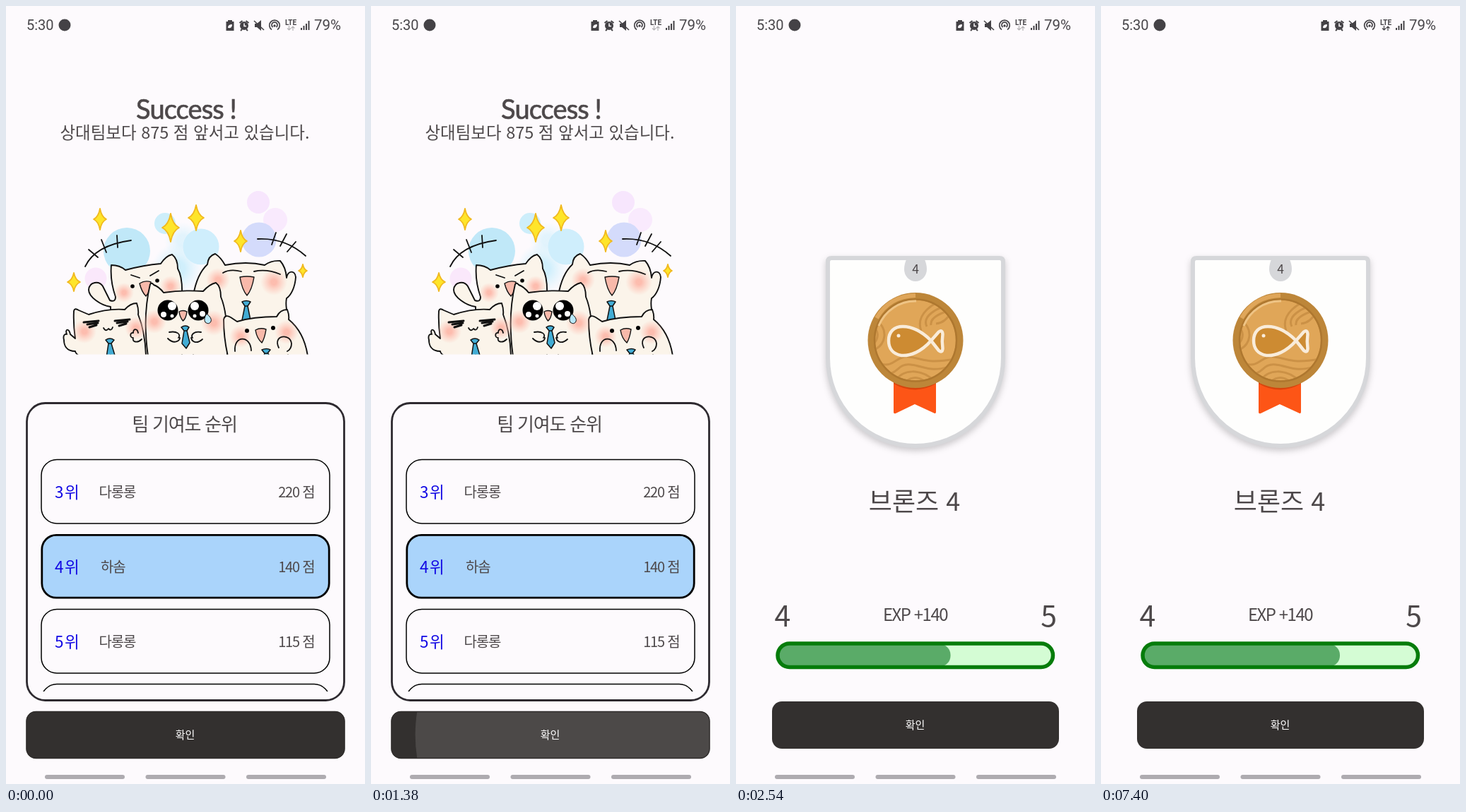
Recreate the animation shown at these times as an HTML page. Size 508x1102 px, loop 8000 ms.

```html
<!DOCTYPE html>
<html lang="ko">
<meta charset="utf-8">
<title>Team result</title>
<style>
  html, body { margin: 0; width: 100%; height: 100%; overflow: hidden; background: #fdfafd; }
  svg { display: block; width: 508px; height: 1102px; }
  text { font: 20px "Noto Sans CJK KR", sans-serif; fill: #4d484a; white-space: pre; }
  .mid { text-anchor: middle; }
  .end { text-anchor: end; }
  .thin { font-weight: 300; }
  .tight { letter-spacing: -1.2px; }
  .status { font-family: Roboto, sans-serif; fill: #48464a; }
  .success { font: 38px Lato, sans-serif; letter-spacing: -.9px; stroke: #4d484a; stroke-width: .7; }
  .rank { font-size: 22.5px; font-weight: 500; letter-spacing: 1.5px; fill: #1208e4; }
  .label { font-size: 15px; fill: #fff; text-anchor: middle; }
  .line { fill: none; stroke: #111; stroke-width: 1.8; stroke-linecap: round; stroke-linejoin: round; }
  .cat { fill: #fbf4ea; stroke: #111; stroke-width: 1.9; stroke-linejoin: round; }
  .beak { fill: #f8b9aa; stroke: #111; stroke-width: 1.4; stroke-linejoin: round; }
  .tie { fill: #42acd4; stroke: #111; stroke-width: 1.5; stroke-linejoin: round; }
  .grain { fill: none; stroke: #cb9146; stroke-width: 3; }
</style>

<svg viewBox="0 0 508 1102">
  <defs>
    <radialGradient id="blush">
      <stop offset=".2" stop-color="#fdb3a4" stop-opacity=".85"/>
      <stop offset="1" stop-color="#ffc0b2" stop-opacity="0"/>
    </radialGradient>
    <radialGradient id="haze">
      <stop offset=".3" stop-color="#d0effc"/>
      <stop offset="1" stop-color="#d8f2fd" stop-opacity="0"/>
    </radialGradient>
    <clipPath id="listClip"><rect x="30" y="625" width="448" height="346"/></clipPath>
    <clipPath id="catClip"><rect x="60" y="250" width="390" height="243.5"/></clipPath>
    <clipPath id="buttonClip"><rect x="28.5" y="999" width="451" height="67" rx="14"/></clipPath>
    <clipPath id="medalClip"><circle cx="254" cy="473.5" r="57"/></clipPath>
  </defs>
  <rect width="508" height="1102" fill="#fdfafd"/>

  <!-- status bar -->
  <g fill="#444246">
    <text class="status" x="29" y="34">5:30</text>
    <circle cx="83" cy="27" r="8.5"/>
    <path d="M314 20h6v2h2.500v13h-11v-13h2.500z"/>
    <path d="M314 31q0-5 6-5q0 6-5 5z" fill="#fdfafd"/>
    <circle cx="337" cy="28" r="6"/>
    <path d="M330.500 24l4-3M343.500 24l-4-3M332 35l2-2M342 35l-2-2" stroke="#444246" stroke-width="2"/>
    <path d="M337 24.500v4h3" fill="none" stroke="#fdfafd" stroke-width="1.500"/>
    <path d="M352 25h3l6-5v15l-6-5h-3z"/>
    <path d="M351 21l14 13" stroke="#444246" stroke-width="1.600"/>
    <path d="M376 33.500a7.300 7.300 0 1 1 8 0M377.500 30a4 4 0 1 1 5 0" fill="none" stroke="#444246" stroke-width="1.700"/>
    <circle cx="380" cy="28" r="1.700"/>
    <text class="status mid" x="403" y="26.500" style="font-size:10px;font-weight:700">LTE</text>
    <path id="arrows" d="M400.500 28v6m-2.500-2.500l2.500 2.500l2.500-2.500M406 35v-6m-2.500 2.500l2.500-2.500l2.500 2.500" fill="none" stroke-width="1.200"/>
    <path d="M417 31h2v3h-2zM420.500 28h2v6h-2zM424 25h2v9h-2zM427.500 21h2v13h-2z"/>
    <text class="status" x="436" y="34" style="font-size:20.500px">79%</text>
  </g>

  <g id="result">
    <text class="mid success" x="255" y="160">Success !</text>
    <text class="mid thin" x="253" y="188" style="font-size:23.500px">상대팀보다 875 점 앞서고 있습니다.</text>

    <g clip-path="url(#catClip)">
      <circle cx="242" cy="372" r="36" fill="url(#haze)"/>
      <circle cx="250" cy="332" r="26" fill="url(#haze)" opacity=".6"/>
      <circle cx="171" cy="347" r="33" fill="#c0e8f8"/>
      <circle cx="225" cy="308" r="15" fill="#cdeefb"/>
      <circle cx="276" cy="341" r="25.500" fill="#cfeefc"/>
      <circle cx="357" cy="278" r="16" fill="#f7e6fd"/>
      <circle cx="381" cy="303" r="17" fill="#f9eafd"/>
      <circle cx="358" cy="331" r="24.500" fill="#d4dbfb"/>
      <circle cx="127" cy="386" r="15.500" fill="#fae8fb"/>
      <g id="stars" fill="#fee52a" stroke="#f1b91f" stroke-width="1.800" stroke-linejoin="round"></g>
      <path class="line" d="M112 369Q126 339 177 332M117 345l13 11M135 331l7 18M157 325l1 17M356 330Q395 328 424 354M382 321l-6 17M397 323l-9 17M410 334l-12 14"/>

      <!-- back row -->
      <path class="cat" d="M148 426C134 424 117 412 117 402C118 390 132 389 137 397L147 417Q155 420 155 412Q147 389 149 367Q161 367 169 374Q195 367 219 365Q226 354 235 352Q243 358 243 372Q250 384 249 410V500H148z"/>
      <path class="cat" d="M265 500V410Q270 380 285 366Q286 354 296 351Q304 356 310 367Q340 361 366 367Q376 360 388 361Q396 370 397 385C399 374 409 374 410 384C409 399 403 410 397 414Q395 424 399 440V500z"/>
      <g fill="url(#blush)">
        <circle cx="167" cy="406" r="14"/><circle cx="233" cy="397" r="15"/>
        <circle cx="300" cy="388" r="17"/><circle cx="379" cy="391" r="19"/>
      </g>
      <path class="line" d="M177 381l12 4M204 382l12-7M307 378Q317 372 333 376M351 376Q369 372 388 380"/>
      <path class="beak" d="M189 393Q197 388 205 391Q204 405 198 411Q192 405 189 393z"/>
      <path class="beak" d="M331 384Q341 382 351 384Q348 402 341 410Q334 402 331 384z"/>
      <circle cx="179" cy="397" r="2.800"/><circle cx="214" cy="389" r="2.800"/>
      <path class="tie" d="M334 419q6-3 12 0l-4 6h-4zM338 425h4l6 30h-16z"/>

      <!-- front row -->
      <path class="cat" d="M104 496Q98 492 98 489C85 489 82 480 82 473C80 466 84 464 86 465C83 457 89 456 91 465L98 471Q95 450 96 432Q97 427 103 431L117 437Q145 428 168 430Q176 421 185 421Q188 430 187 437Q197 462 198 496z"/>
      <path class="cat" d="M201 496Q193 440 204 394Q206 391 209 395Q217 398 223 406Q250 402 279 404Q288 394 297 392Q304 397 304 412Q315 438 313 496z"/>
      <path class="cat" d="M314 496Q308 470 308 444Q310 436 318 441L327 447Q350 440 383 440Q388 430 398 430Q401 438 400 444Q422 462 427 496z"/>
      <g fill="url(#blush)">
        <circle cx="111" cy="461" r="17"/><circle cx="184" cy="456" r="16"/>
        <circle cx="210" cy="447" r="17"/><circle cx="294" cy="449" r="18"/>
        <circle cx="332" cy="468" r="16"/><circle cx="397" cy="462" r="17"/>
      </g>
      <path class="line" d="M138 456q3 6 7 1q4 4 6-2M192 472C186 478 178 476 180 470C175 470 175 462 180 463C180 456 186 457 187 463"/>
      <path class="line" style="stroke-width:3" d="M110 448l21-2M115 451l15-2M118 455l10-3M154 446l21-2M157 449l15-2M160 453l10-3"/>
      <path class="tie" d="M141 473q6-4 12 0l-4 5h-4zM145 478h4l6 20h-13z"/>

      <circle cx="229" cy="431" r="14.500"/><circle cx="272" cy="431" r="14.500"/>
      <g fill="#fff">
        <circle cx="235" cy="425" r="6"/><circle cx="223" cy="437" r="4"/><circle cx="235" cy="439" r="2.500"/>
        <circle cx="267" cy="425" r="6"/><circle cx="278" cy="436" r="4"/><circle cx="267" cy="439" r="2.500"/>
      </g>
      <path class="beak" d="M245 433q5-3 11 0q-1 9-5.500 13q-4.500-5-5.500-13z"/>
      <path d="M284 436q8 6 6 11q-3 5-8 1q-3-5 2-12z" fill="#b9e8fa" stroke="#111"/>
      <path class="tie" d="M248 455q6-4 11 0l-3 5h-4zM252 460h4l4 17l-5 8l-6-7z"/>
      <path class="line" d="M231 462C242 460 248 465 244 470M229 471C238 480 246 474 246 470M276 462C266 460 261 466 264 470M278 472C269 480 263 475 262 470"/>

      <circle cx="341" cy="460" r="3"/><circle cx="378" cy="456" r="3"/>
      <path class="beak" d="M353 459q7-4 15-1q-2 13-6 19q-7-6-9-18z"/>
      <path class="line" d="M324 489C322 466 346 466 347 488M386 484C377 466 402 463 404 478Q404 486 398 489"/>
      <path class="tie" d="M362 487q7-3 12 0l-4 5h-4zM366 492h5l3 6h-10z"/>
    </g>

    <rect x="29.500" y="562.500" width="449" height="421" rx="26" fill="none" stroke="#2e2a30" stroke-width="2.800"/>
    <text class="mid tight" x="252.500" y="602" style="font-size:26px;font-weight:500">팀 기여도 순위</text>
    <g id="rows" clip-path="url(#listClip)"></g>

    <g clip-path="url(#buttonClip)">
      <rect x="28" y="999" width="452" height="67" fill="#33302f"/>
      <circle id="ripple" cy="1032.500" fill="#fff"/>
    </g>
    <rect x="29" y="999.500" width="450" height="66" rx="13.500" fill="none" stroke="#302d2c" stroke-width="1.300"/>
    <text class="label" x="253.500" y="1038">확인</text>
  </g>

  <g id="level">
    <path d="M135 357H373Q378 357 378 362V499A124 124 0 0 1 130 499V362Q130 357 135 357z" fill="#fefefd" stroke="#d6d7da" stroke-width="6" style="filter:drop-shadow(0 4px 5px #0003)"/>
    <path d="M242 357h24q4 8 4 16a16 17 0 0 1-32 0q0-8 4-16z" fill="#d6d7da"/>
    <text class="mid" x="254" y="379" style="font-size:17.500px">4</text>

    <path d="M223 530H283V575q0 3-3 1.500L253 564L226 577q-3 1-3-1.500z" fill="#fd5516"/>
    <path d="M223 535Q253 552 283 535V530H223z" fill="#d8440c"/>
    <circle cx="254" cy="473.500" r="67.500" fill="#bd8639"/>
    <path d="M199 442Q217 411 254 410" fill="none" stroke="#dfa65a" stroke-width="6"/>
    <circle cx="254" cy="473.500" r="57" fill="#e0a658"/>
    <g class="grain" clip-path="url(#medalClip)">
      <path d="M262 460C254 438 276 418 310 412M270 454C263 440 282 427 310 421M276 452C274 441 292 432 314 430M283 450Q296 449 304 434M197 444C216 457 214 480 192 489M194 453Q207 466 193 481"/>
      <path d="M205 507C225 512 226 495 245 497C267 500 270 507 310 500M216 521C229 520 230 506 247 508C267 510 274 520 304 510M225 532C235 514 262 512 283 533M238 534Q253 519 270 534"/>
    </g>
    <circle cx="254" cy="473.500" r="58" fill="none" stroke="#ae772f" stroke-width="2.500"/>
    <path d="M202 453A55.500 55.500 0 0 1 255 418" fill="none" stroke="#efc485" stroke-width="3"/>
    <path d="M276 474C262 490 246 496 234 495C222 493 216 485 216 474C216 461 224 454 236 454C250 454 264 462 276 474z" fill="#cd8b32" stroke="#f9ecda" stroke-width="4.500"/>
    <path d="M276 474L287 461.500Q292 458 292.500 465Q291 475 292.500 485Q292 492 287 488z" fill="#cd8b32" stroke="#f9ecda" stroke-width="4.500" stroke-linejoin="round"/>
    <circle cx="230" cy="467" r="2.500" fill="#f9ecda"/>

    <text class="mid thin" x="252.500" y="715" style="font-size:36px">브론즈 4</text>
    <text x="54.500" y="879" style="font-size:41px">4</text>
    <text class="end" x="454" y="879" style="font-size:41px">5</text>
    <text class="mid thin" x="253.500" y="871" style="font-size:24px;letter-spacing:-1.500px">EXP +140</text>
    <rect x="59" y="903" width="389.500" height="33.500" rx="16.750" fill="#d4fcd4"/>
    <rect id="fill" x="60" y="904" height="31.500" rx="15" fill="#5aab68"/>
    <rect x="59" y="903" width="389.500" height="33.500" rx="16.750" fill="none" stroke="#067c0b" stroke-width="5.500"/>
    <rect x="51" y="985" width="406" height="67" rx="14" fill="#33302f"/>
    <text class="label" x="253.500" y="1024">확인</text>
  </g>

  <g fill="#aeabb0">
    <rect x="55" y="1089" width="113" height="6" rx="3"/>
    <rect x="197.500" y="1089" width="113" height="6" rx="3"/>
    <rect x="340" y="1089" width="113" height="6" rx="3"/>
  </g>
</svg>

<script>
  const LOOP = 8000, PRESS = 1100, SWITCH = 1420, FILL_END = 3660, NETWORK = 7400;
  const $ = id => document.getElementById(id);
  const clamp = v => Math.max(0, Math.min(1, v));

  const star = (x, y, w, h) =>
    `<path d="M${x} ${y - h}Q${x + w * .25} ${y - h * .2} ${x + w} ${y}Q${x + w * .25} ${y + h * .2} ${x} ${y + h}` +
    `Q${x - w * .25} ${y + h * .2} ${x - w} ${y}Q${x - w * .25} ${y - h * .2} ${x} ${y - h}z"/>`;
  $('stars').innerHTML = [
    [133, 302, 9, 15], [233, 314, 12, 20], [269, 300, 11, 18],
    [332, 333, 9, 15], [96, 391, 9, 13], [420, 375, 6, 9]
  ].map(s => star(...s)).join('');

  const row = ([name, points, mine], i) => {
    const y = 642.5 + i * 106, inset = mine ? .8 : 0;
    return `<rect x="${50 + inset}" y="${y + inset}" width="${408 - 2 * inset}" height="${90.5 - 2 * inset}" rx="${22 - 2 * inset}"
        fill="${mine ? '#aad4fb' : 'none'}" stroke="#000" stroke-width="${mine ? 2.8 : 1.5}"/>
      <text class="rank" x="69" y="${y + 54}">${i + 3}위</text>
      <text class="tight" x="${mine ? 134 : 131.5}" y="${y + 53}">${name}</text>
      <text class="tight end" x="436.500" y="${y + 53}">${points} 점</text>`;
  };
  $('rows').innerHTML = [['다롱롱', 220], ['하솜', 140, true], ['다롱롱', 115], ['', '']].map(row).join('');

  function draw(now) {
    const t = now % LOOP;
    const pressed = clamp((t - PRESS) / 300);
    $('ripple').setAttribute('cx', 362 - 94 * pressed);
    $('ripple').setAttribute('r', 127 + 90 * pressed);
    $('ripple').setAttribute('opacity', t < PRESS ? 0 : .055 + .07 * pressed);

    $('result').style.display = t < SWITCH ? '' : 'none';
    $('level').style.display = t < SWITCH ? 'none' : '';
    const grown = (1 - Math.cos(Math.PI * clamp((t - SWITCH) / (FILL_END - SWITCH)))) / 2;
    $('fill').setAttribute('width', 209 + 69 * grown);
    $('arrows').setAttribute('stroke', t < NETWORK ? '#b5b3b6' : '#444246');
    requestAnimationFrame(draw);
  }
  draw(performance.now());
</script>
</html>
```
